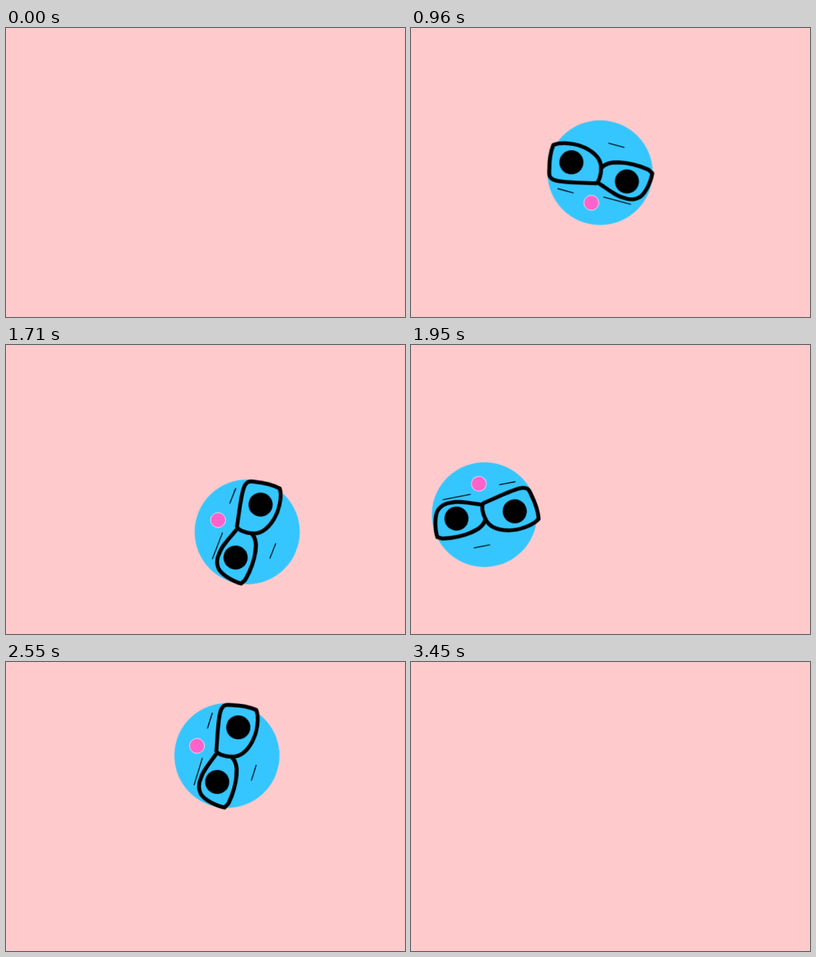
An HTML page for the animation above (3630 ms loop, 550x400 px).

```html
<!DOCTYPE html>
<html lang="en">
<head>
<meta charset="utf-8">
<title>Bouncing ball with glasses</title>
<style>
  html, body {
    margin: 0;
    width: 100%;
    height: 100%;
    overflow: hidden;
    background: #ffcacb;
  }
  svg { display: block; width: 100vw; height: 100vh; }

  /* 121 ticks of 30 ms; each leg between two bounces is linear, one step per tick */
  #ball { animation: bounce 3630ms -2ms infinite; }
  @keyframes bounce {
    0% {
      transform: translate(-78px, 205px) rotate(345deg);
      animation-timing-function: step-end;
    }
    4.9587% {
      transform: translate(-78px, 205px) rotate(345deg);
      animation-timing-function: steps(15);
    }
    17.3554% {
      transform: translate(114.6px, 72.5px) rotate(216deg);
      animation-timing-function: steps(22);
    }
    35.5372% {
      transform: translate(406.6px, 328px) rotate(-216deg);
      animation-timing-function: steps(9);
    }
    42.9752% {
      transform: translate(477px, 273.6px) rotate(-300deg);
      animation-timing-function: steps(14);
    }
    54.5455% {
      transform: translate(72.3px, 231.8px) rotate(-199deg);
      animation-timing-function: steps(29);
    }
    78.5124% {
      transform: translate(426.7px, 75.6px) rotate(-304.4deg);
      animation-timing-function: steps(20);
    }
    95.0413%, 100% {
      transform: translate(629.7px, 13.5px) rotate(-375deg);
      animation-timing-function: step-end;
    }
  }
</style>
</head>
<body>
<svg viewBox="0 0 550 400">
  <g id="ball">
    <circle r="72.5" fill="#35c6ff"/>
    <g transform="translate(-260.5 -200.3)">
      <path d="M272 159.5L294 165.5M202 222.3L224 228.5M265 234L303 244.2"
            stroke="#000" stroke-width="1.3"/>
      <circle cx="248.5" cy="242" r="10.3" fill="#ff62cb" stroke="#ffd9e6"/>
      <circle cx="221" cy="186" r="16.6"/>
      <circle cx="297.5" cy="212.5" r="16.6"/>
      <g fill="none" stroke="#000" stroke-width="5.4" stroke-linecap="round" stroke-linejoin="round">
        <path d="M196 162C208 157 228 160 240 166C254 173 262 182 262 194
                 C262 204 259 213 255 215C240 214 212 215 199 211
                 C190 208 190 204 190.5 196C190.5 182 192 172 196 162Z"/>
        <path d="M262 194C268 187 276 186 286 186C302 186.5 318 192 327 196L332.5 201
                 C331 212 324 226 318 232C312 238 302 238 296 236
                 C282 233 270 222 258 214.5"/>
      </g>
    </g>
  </g>
</svg>
</body>
</html>
```
